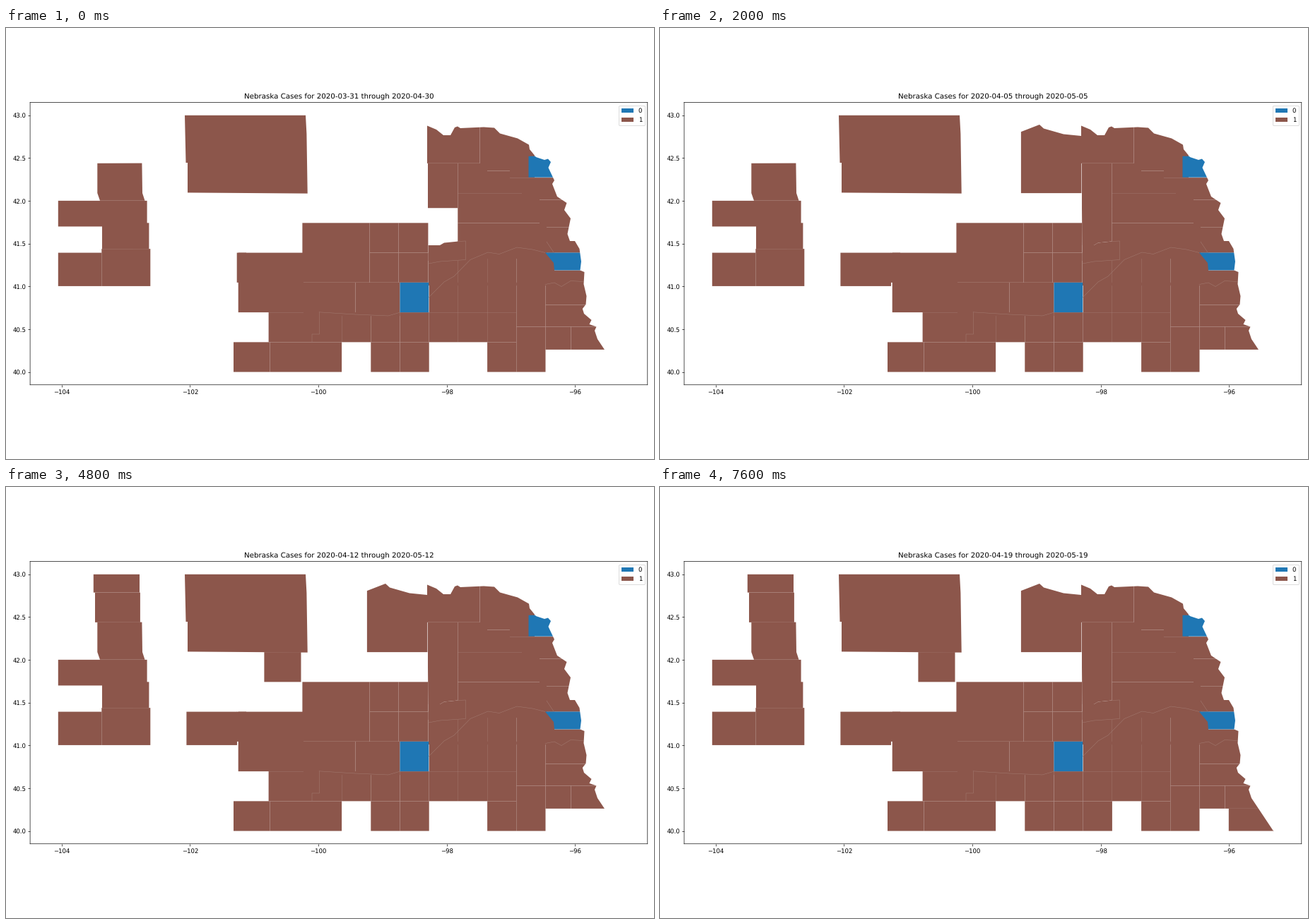
A matplotlib script for the animation above (8000 ms loop, 917 by 611 pixels).

```python
import numpy as np
import matplotlib.pyplot as plt
from matplotlib.animation import FuncAnimation
from matplotlib.patches import Patch, Polygon

WIDTH, HEIGHT, DPI = 917, 611, 61.1
FRAMES, INTERVAL = 20, 400
LEFT, RIGHT, TOP, BOTTOM = 34.1, 907.8, 105.5, 505.8
BROWN, BLUE, SEAM = "#8c564b", "#1f77b4", "#a27a70"
ROW, SOUTH, EAST = 42.25, 487.6, 869   # township row height, state edges

plt.rcParams.update({"text.hinting": "none", "font.size": 10.1})
fig = plt.figure(figsize=(WIDTH / DPI, HEIGHT / DPI), dpi=DPI)
ax = fig.add_axes([LEFT / WIDTH, 1 - BOTTOM / HEIGHT,
                   (RIGHT - LEFT) / WIDTH, (BOTTOM - TOP) / HEIGHT])
# Map shapes are laid out in stage pixels, y pointing down.
ax.set_xlim(LEFT, RIGHT)
ax.set_ylim(BOTTOM, TOP)


def area(points, color=BROWN, zorder=1):
    return ax.add_patch(Polygon(points, facecolor=color, linewidth=0,
                                snap=False, zorder=zorder))


def counties(low, high, *edges, color=BROWN, zorder=1):
    """Fill a strip of neighbours between two township rows."""
    y0, y1 = SOUTH - ROW * low, SOUTH - ROW * high
    return [area([(a, y0), (b, y0), (b, y1), (a, y1)], color, zorder)
            for a, b in zip(edges, edges[1:])]


def border(*points):
    ax.plot(*zip(*points), color=SEAM, linewidth=0.6, snap=False, zorder=1.1)


def column(i):
    """Township column edge, counted westwards."""
    return 763.5 - 41.2 * i


def columns(first, last):
    return [column(i) for i in range(first, last - 1, -1)]


# Southern rows
counties(0, 1, 322, 373.5, 424, column(7))
counties(0, 1, *columns(6, 4))
counties(0, 1, *columns(2, 1))
counties(0, 1.52, *columns(1, 0))
counties(1, 2, 371.6, *columns(7, 1))
counties(1.52, 3, *columns(1, 0))
counties(0.75, 1.52, column(0), 799.5, EAST)
counties(1.52, 2.25, column(0), EAST)
counties(2.25, 3, column(0), EAST)

# Middle rows; strips overlap where a river is the border
counties(2, 4, 328.7, 421)
counties(3, 4, 326.7, 340)
counties(1.88, 3, 421, 494.5, column(5))
counties(2, 3, *columns(4, 1))
counties(3, 5, 419.4, 514.5)
counties(3, 4, 514.5, 555.5, 597.7)
counties(4, 5, 514.5, 555.5, 597.4)
counties(2.9, 4, 598, *columns(3, 1), 776)
counties(2.88, 3.41, 776, EAST)
counties(3.8, 5, 639.3, 692, 723, 765)
counties(4, 4.85, 765, EAST)
area([(597.6, 308), (614, 308), (620, 304.5), (645, 302), (645, 330),
      (597.6, 330)])

# Northern rows
counties(5, 6, 639.3, 681, 713, 755)
counties(4.85, 5.78, 755, EAST)
counties(5.78, 6.52, 730, EAST)
counties(5.5, 7, 597, 639.3)
counties(6, 7, 639.3, 681)
counties(6, 6.75, 681, 713)
counties(6, 6.52, 713, 730)
counties(7, 8.3, 596, 670.5)
counties(6.75, 8.3, 670.5, 713)
counties(6.52, 8.3, 713, 748)

# Panhandle and the large north-central block
area([(129.3, 191.8), (192.4, 191.6), (193, 234), (196.5, 244.8),
      (133, 244.8), (129.3, 234)])
counties(4.88, 5.745, 73.8, 136)
counties(4.13, 5.745, 136, 199.6)
counties(4.13, 5, 180, 202.4)
counties(2.88, 4, 73.8, 135.3)
counties(2.88, 4.13, 135.3, 204.3)
area([(253, 123.8), (424, 123.8), (425.4, 150), (426.7, 234.6),
      (257, 233.4), (257, 191), (254.5, 191)])

# River and diagonal borders
border((598, 382), (620, 360), (634, 352), (657, 328.5), (682, 318),
       (698, 320.5), (723, 311), (745, 314), (763, 318.5))
border((598, 334), (614, 331), (650.5, 328.5), (650.5, 302), (639, 302.5))
border((443, 402.8), (494, 406), (541, 408), (558, 403))
border((443.5, 403), (443.5, 434), (433, 434), (433, 445))
border((763, 363.5), (776, 361), (786, 366.5), (799, 358.5), (817, 359.5))
border((765, 303), (775, 318))

# Counties in the second group
counties(2, 3, column(5), 598.2, color=BLUE, zorder=1.2)
counties(6.53, 7.24, 739.5, 780, color=BLUE, zorder=1.2)
area([(763, 318.5), (EAST, 318.5), (EAST, 343.4), (776, 343.4),
      (775, 333)], BLUE, 1.2)

# Counties that join later, with the step at which they appear
late = [
    (2, counties(2.88, 4, 255.4, 327)),
    (3, counties(6, 8.4, 510.9, 596.4)),
    (4, [area([(597, 255), (639.3, 255), (639.3, 302.5), (620, 304.5),
               (614, 308), (597.5, 308)])]),
    (6, counties(5, 6, 365.4, 417.5)),
    (9, counties(8, 8.61, 123.8, 189) + counties(7, 8, 126, 189.9)),
    (13, counties(0, 0.75, 804.8, EAST)),
    (16, counties(0, 1, *columns(4, 3))),
]

# Everything beyond the northern and eastern rivers is blank
river = [
    (510, 147.5), (537, 137), (543, 142.5), (571, 150.5), (596, 153),
    (596, 138.5), (609, 144), (619, 152), (629, 152), (635, 141),
    (639, 139.5), (643, 142), (676, 140.5), (691, 141.5), (699, 149.5),
    (724, 156.5), (740, 165.5), (741, 172), (750, 183), (762, 187),
    (767, 185.5), (771, 190), (767.5, 198), (776, 216), (773, 221),
    (780, 239), (793.5, 248), (790, 258), (799, 270), (794.5, 292),
    (798, 302), (805, 302), (811.5, 313), (814, 331), (812.5, 343.5),
    (818.5, 346), (817.5, 363), (821.5, 380), (820.5, 392), (815.8, 398),
    (818, 405), (828.5, 414), (825.5, 420), (835.5, 423.5), (833, 429),
    (837, 441), (847, 456), (868, SOUTH),
]
area(river + [(900, SOUTH), (900, 115), (510, 115)], "white", 1.5)

# Axes furniture
degree_x, degree_y = 90.83, 121.27
ax.set_xticks([78.7 + 2 * degree_x * i for i in range(5)],
              [f"\u2212{104 - 2 * i}" for i in range(5)])
ax.set_yticks([SOUTH - degree_y * i / 2 for i in range(7)],
              [f"{40 + i / 2:.1f}" for i in range(7)])
for spine in ax.spines.values():
    spine.set(snap=False, linewidth=0.8)
ax.legend(handles=[Patch(color=BLUE, label="0", linewidth=0),
                   Patch(color=BROWN, label="1", linewidth=0)],
          loc="upper right")
title = ax.set_title("")


def update(frame):
    start = np.datetime64("2020-03-31") + frame
    title.set_text(f"Nebraska Cases for {start} through {start + 30}")
    for first, patches in late:
        for patch in patches:
            patch.set_visible(frame >= first)
    return [title]


anim = FuncAnimation(fig, update, frames=FRAMES, interval=INTERVAL,
                     repeat=True, repeat_delay=0, blit=False)
plt.show()
```
